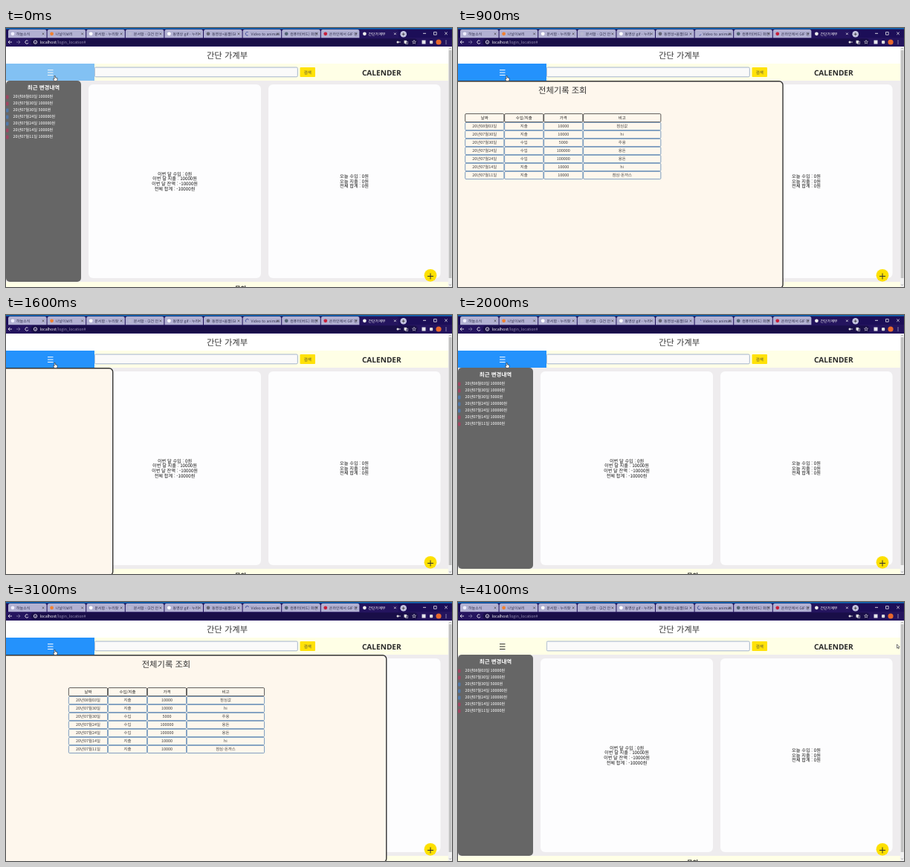
An HTML page with a canvas that plays this animation: 600x349 px, repeating every 4.2 s.

```html
<!DOCTYPE html>
<html lang="ko">
<head>
<meta charset="utf-8">
<style>
html, body { margin: 0; width: 100%; height: 100%; overflow: hidden; background: #fff; }
canvas { display: block; }
</style>
</head>
<body>
<canvas id="stage" width="600" height="349"></canvas>
<script>
const ctx = document.getElementById('stage').getContext('2d');
ctx.textRendering = 'geometricPrecision';
const LOOP = 4200, STEP = 100, SLIDE = 500, PAGE_W = 595;
const CREAM = '#ffffe6', DARK = '#333';
const KOREAN = '"Noto Sans CJK KR", "Noto Sans CJK", "Noto Sans CJK JP", sans-serif';

const records = [
  ['20년08월03일', '지출', '10000', '점심값'],
  ['20년07월30일', '지출', '10000', 'hi'],
  ['20년07월30일', '수입', '5000', '주용'],
  ['20년07월24일', '수입', '100000', '용돈'],
  ['20년07월24일', '수입', '100000', '용돈'],
  ['20년07월14일', '지출', '10000', 'hi'],
  ['20년07월11일', '지출', '10000', '점심-돈까스']
];
const tabs = [
  ['하늘소식', '#eef'], ['나날이보리', '#f08030'], ['문서함 - 누리찾', '#fff'],
  ['문서함 - (2건 안', '#b8b8d0'], ['동영상 gif - 누리', '#fff'], ['동영상+움짤(GI', '#667'],
  ['Video to animati', null], ['컴퓨터(버드) 화면', '#567'], ['온라인에서 GIF 만', '#c8203c'],
  ['간단가계부', '#eee']
];

// CSS "ease" curve, solved by bisection
function ease(x) {
  if (x <= 0) return 0;
  if (x >= 1) return 1;
  let lo = 0, hi = 1;
  for (let i = 0; i < 24; i++) {
    const u = (lo + hi) / 2;
    if (0.75 * u * (1 - u) + u ** 3 < x) lo = u; else hi = u;
  }
  return 0.3 * lo * (1 - lo) ** 2 + 3 * lo * lo * (1 - lo) + lo ** 3;
}

const ramp = (t, start) => ease((t - start) / SLIDE);

function mix(a, b, p) {
  return `rgb(${a.map((v, i) => Math.round(v + (b[i] - v) * p))})`;
}

function rect(x, y, w, h, fill) {
  ctx.fillStyle = fill;
  ctx.fillRect(x, y, w, h);
}

function box(x, y, w, h, r, fill, stroke, width = 1) {
  ctx.beginPath();
  ctx.roundRect(x, y, w, h, r);
  if (fill) { ctx.fillStyle = fill; ctx.fill(); }
  if (stroke) { ctx.strokeStyle = stroke; ctx.lineWidth = width; ctx.stroke(); }
}

function dot(x, y, r, fill) {
  ctx.beginPath();
  ctx.arc(x, y, r, 0, Math.PI * 2);
  ctx.fillStyle = fill;
  ctx.fill();
}

function path(points, stroke, width = 0.8, fill) {
  ctx.beginPath();
  for (let i = 0; i < points.length; i += 2) ctx.lineTo(points[i], points[i + 1]);
  if (fill) { ctx.closePath(); ctx.fillStyle = fill; ctx.fill(); }
  ctx.strokeStyle = stroke;
  ctx.lineWidth = width;
  ctx.stroke();
}

function label(str, x, y, size, { color = '#222', weight = 400, align = 'center', font = KOREAN } = {}) {
  ctx.font = `${weight} ${size}px ${font}`;
  ctx.textAlign = align;
  ctx.textBaseline = 'alphabetic';
  ctx.fillStyle = color;
  ctx.fillText(str, x, y + size * 0.36);
}

function cross(x, y, r, color, width = 0.7) {
  path([x - r, y - r, x + r, y + r], color, width);
  path([x + r, y - r, x - r, y + r], color, width);
}

function spinner(x, y, t) {
  const phase = t / 1400 * Math.PI * 2;
  const sweep = 2.3 + 1.7 * Math.cos(phase);
  ctx.beginPath();
  ctx.arc(x, y, 2.3, Math.PI - sweep / 2 + phase, Math.PI + sweep / 2 + phase);
  ctx.strokeStyle = '#3b4a9c';
  ctx.lineWidth = 0.9;
  ctx.stroke();
}

function drawBrowser(t) {
  rect(0, 0, 600, 25, '#1c0e58');
  rect(0, 0, 600, 1.6, '#1268b4');
  rect(0, 13, 600, 12, '#24145e');
  tabs.forEach(([title, icon], i) => {
    const x = 3 + i * 52.6, active = i === tabs.length - 1;
    box(x, 2, 51.6, 11.2, [2.5, 2.5, 0, 0], active ? '#24145e' : '#b2b1d2');
    if (icon) dot(x + 6, 7.8, 2.4, icon); else spinner(x + 6, 7.8, t);
    label(title, x + 11, 7.8, 5, { color: active ? '#fff' : '#30304c', align: 'left' });
    cross(x + 47, 7.8, 1.3, active ? '#fff' : '#444');
  });
  dot(534.7, 8.3, 4.3, '#c5c4e0');
  path([532.7, 8.3, 536.7, 8.3], '#333');
  path([534.7, 6.3, 534.7, 10.3], '#333');
  path([561, 7.3, 565, 7.3], '#fff');
  box(575.5, 5.5, 3.7, 3.7, 0, null, '#fff', 0.7);
  cross(592, 7.3, 1.8, '#fff');

  box(33, 14.3, 521, 9.6, 4.8, '#190e48');
  path([8, 19, 3, 19], '#fff');
  path([5.3, 16.7, 3, 19, 5.3, 21.3], '#fff');
  path([14, 19, 19, 19], '#8880ac');
  path([16.7, 16.7, 19, 19, 16.7, 21.3], '#8880ac');
  ctx.beginPath();
  ctx.arc(28, 19, 2.2, 0.4, 5.5);
  ctx.strokeStyle = '#fff';
  ctx.stroke();
  ctx.beginPath();
  ctx.arc(39.5, 19, 2.2, 0, Math.PI * 2);
  ctx.stroke();
  path([39.5, 18.6, 39.5, 20.4], '#fff', 0.6);
  label('localhost', 45.5, 19.2, 5.2, { color: '#fff', align: 'left' });
  const hostWidth = ctx.measureText('localhost').width;
  label('/login_location#', 45.5 + hostWidth, 19.2, 5.2, { color: '#9b94b9', align: 'left' });

  dot(527, 19, 1.5, '#ddd');
  path([528, 19, 531, 19], '#ddd');
  box(535.5, 16.8, 3.5, 4, 0, '#ddd');
  box(537.5, 18.2, 3, 3.4, 0, null, '#ddd', 0.6);
  const star = [];
  for (let i = 0; i <= 10; i++) {
    const a = i * Math.PI / 5 - Math.PI / 2, r = i % 2 ? 1.1 : 2.6;
    star.push(549 + r * Math.cos(a), 19 + r * Math.sin(a));
  }
  path(star, '#ddd', 0.6);
  box(559.5, 16.5, 5, 5, 0, '#e6e6ec');
  box(570, 17, 4.2, 4.2, 1, '#ddd');
  dot(582, 19, 3.6, '#e8682c');
  [17, 19, 21].forEach(y => dot(592, y, 0.6, '#fff'));
}

function drawPage() {
  rect(0, 25, 600, 324, '#fff');
  label('간단 가계부', 297.5, 37, 11.3, { color: DARK, weight: 500 });
  rect(0, 48, PAGE_W, 23, CREAM);
  box(119.3, 53, 273, 12.8, 1.5, '#fafafa', '#a3b4cc');
  box(395.5, 53, 20.5, 13, 1, '#ffe208');
  label('검색', 405.8, 59.7, 5.6, { color: '#444' });
  label('CALENDER', 505.3, 60, 10.1, { color: '#2a2a2a', weight: 700, font: '"Open Sans", sans-serif' });

  rect(0, 71, PAGE_W, 271, '#eeecee');
  box(0, 71, 101, 271, 5, '#666');
  label('최근 변경내역', 50.5, 80, 7.5, { color: '#fff', weight: 700 });
  records.forEach(([date, kind, amount], i) => {
    const y = 92.5 + i * 9;
    box(0, y - 2, 3.5, 5, 1, kind === '지출' ? '#a04560' : '#5078a8');
    label(`${date} ${amount}원`, 9.5, y, 5.35, { color: '#fff', align: 'left' });
  });

  box(111, 76, 232, 261, 6, '#fdfdfe');
  box(353, 76, 231.5, 261, 6, '#fdfdfe');
  const summary = { color: '#111', weight: 500 };
  ['이번 달 수입 : 0원', '이번 달 지출 : 10000원', '이번 달 잔액 : -10000원', '전체 합계 : -10000원']
    .forEach((line, i) => label(line, 227, 196.3 + i * 6.85, 6.2, summary));
  ['오늘 수입 : 0원', '오늘 지출 : 0원', '전체 합계 : 0원']
    .forEach((line, i) => label(line, 468.5, 199.5 + i * 6.85, 6.2, summary));

  rect(0, 342, PAGE_W, 7, CREAM);
  label('문의', 315.5, 351.5, 8.2, { weight: 700 });
  dot(571, 333.3, 8.4, '#fde000');
  path([567, 334.5, 575, 334.5], DARK, 1);
  path([571, 330.5, 571, 338.5], DARK, 1);

  rect(PAGE_W, 25, 5, 324, '#f1f1f1');
  rect(595.7, 30, 3.8, 307, '#c1c1c1');
  path([596.3, 28.3, 597.5, 27, 598.7, 28.3], '#666', 0.6);
  path([596.3, 345.5, 597.5, 346.8, 598.7, 345.5], '#666', 0.6);
}

function drawPanel(open) {
  if (open <= 0.002) return;
  const left = PAGE_W * (open - 1);
  ctx.save();
  ctx.beginPath();
  ctx.rect(0, 70, PAGE_W, 279);
  ctx.clip();
  box(left + 0.7, 71.7, PAGE_W - 1.4, 279, 5, '#fef7ed', DARK, 1.4);
  label('전체기록 조회', left + 298, 83.5, 11.3, { color: DARK, weight: 500 });
  const widths = [53, 53, 53, 105];
  [['날짜', '수입/지출', '가격', '비고'], ...records].forEach((row, i) => {
    const top = i ? 116.4 + i * 11 : 115.6;
    const height = i ? 10.2 : 11;
    let x = left + 166.5;
    row.forEach((value, col) => {
      box(x + 0.4, top, widths[col] - 0.8, height, 1.3, null, i ? '#5c87b4' : '#333', 0.8);
      label(value, x + widths[col] / 2, top + height / 2, 5.4, { weight: i ? 400 : 500, color: i ? '#444' : '#222' });
      x += widths[col];
    });
  });
  ctx.restore();
}

function drawMenuButton(hover) {
  rect(0, 48, 119, 23, mix([255, 255, 230], [36, 146, 252], hover));
  const color = mix([40, 40, 40], [255, 255, 255], Math.min(1, hover * 1.7));
  [56.7, 60.1, 63.5].forEach(y => path([56, y, 63.5, y], color, 1));
}

function drawCursor(x, y, hand) {
  ctx.save();
  ctx.translate(x, y);
  if (hand) {
    path([-1, 0, 0.2, 0, 0.4, 2.4, 3, 3, 3, 5.4, 2.2, 7, -1, 7, -2.6, 4.3, -2, 3.8, -1, 4.5], '#222', 0.6, '#fff');
  } else {
    path([0, 0, 0, 5.2, 1.2, 4.2, 2, 6, 2.8, 5.6, 2, 3.8, 3.6, 3.7], '#222', 0.6, '#fff');
  }
  ctx.restore();
}

function render(t) {
  const hover = ramp(t, -165) - ramp(t, 3600);
  const open = ramp(t, 680) - ramp(t, 1371) + ramp(t, 2307) - ramp(t, 3037);
  const travel = ease((t - 3600) / 300);
  drawPage();
  drawPanel(open);
  drawMenuButton(hover);
  drawBrowser(t);
  drawCursor(66 + 524.5 * travel, 64.5 - 7.5 * travel, travel === 0);
}

function tick() {
  const t = performance.now() % LOOP;
  render(Math.floor(t / STEP) * STEP);
  requestAnimationFrame(tick);
}
tick();
</script>
</body>
</html>
```
